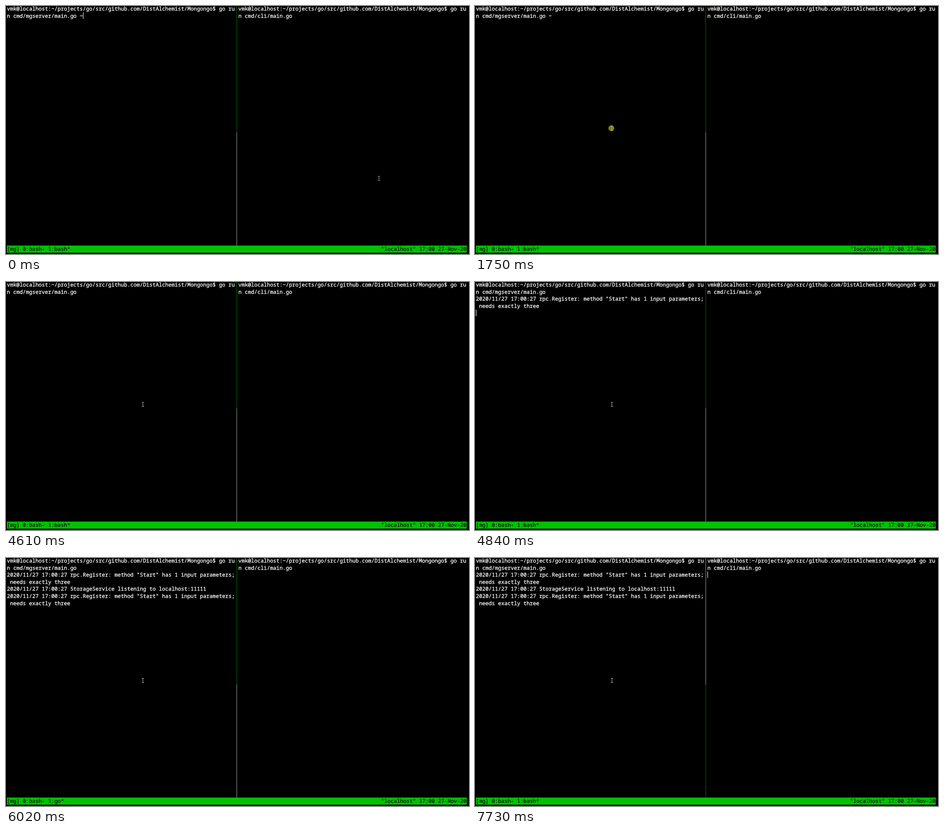
An HTML page that plays this animation: 1023 px wide and 547 px high, repeating every 8000 ms.

```html
<!DOCTYPE html>
<html lang="en">
<head>
<meta charset="utf-8">
<title>Two terminal panes</title>
<style>
  html, body { margin: 0; width: 100%; height: 100%; overflow: hidden; background: #000; }
  svg { display: block; width: 1023px; height: 547px; }
  text {
    font: 11.677px "Noto Sans Mono", "DejaVu Sans Mono", monospace;
    font-variant-ligatures: none;
    text-rendering: geometricPrecision;
    white-space: pre;
    fill: #fff;
    stroke: #fff;
    stroke-width: .3px;
  }
  .status { fill: #000; stroke: #000; stroke-width: .15px; }
</style>
</head>
<body>
<svg id="stage" viewBox="0 0 1023 547"></svg>
<script>
const LOOP = 8000;
const LEFT = 0, RIGHT = 73;              // first column of each pane
const GREEN = '#00c200', DIM = '#007800', GREY = '#a8a8a8';
const stage = document.getElementById('stage');

const colX = col => 2 + col * 7.006;
const rowY = row => -2 + row * 15.6;

function add(tag, attrs, content = '') {
  const el = document.createElementNS('http://www.w3.org/2000/svg', tag);
  for (const key in attrs) el.setAttribute(key, attrs[key]);
  el.textContent = content;
  return stage.appendChild(el);
}

const rect = (x, y, width, height, fill) => add('rect', { x, y, width, height, fill });
const write = (col, row, str, cls = '') =>
  add('text', { x: colX(col), y: rowY(row) + 12, class: cls }, str);

const prompt = 'vmk@localhost:~/projects/go/src/github.com/DistAlchemist/Mongongo$ go ru';
const warning = ['2020/11/27 17:00:27 rpc.Register: method "Start" has 1 input parameters;',
                 ' needs exactly three'];
const listening = '2020/11/27 17:00:27 StorageService listening to localhost:11111';

// Static screen
write(LEFT, 0, prompt);
write(RIGHT, 0, prompt);
write(RIGHT, 1, 'n cmd/cli/main.go');
const upper = rect(509.4, 0, 1, 279, DIM);
const lower = rect(509.4, 279, 1, 249.4, GREY);
rect(2, 528.4, 1016, 15.6, GREEN);
write(118, 34, '"localhost" 17:00 27-Nov-20', 'status');

// Changing parts
const command = write(LEFT, 1, '');
const status = write(LEFT, 34, '', 'status');
const output = [...warning, listening, ...warning].map((line, i) => write(LEFT, i + 2, line));
const caret = rect(0, 0, 1.1, 14.4, '#fff');
const click = add('circle', { cx: 301.2, cy: 269.5, r: 6.5, fill: '#7d7d00' });
const pointer = add('path', {
  d: 'M-2.5-4.5H2.5M0-4V4M-2.5 4.5H2.5',
  fill: 'none', stroke: '#b4b4b4', 'stroke-width': 1
});

// [time, column, row]; no column means the caret is blinked off
const carets = [
  [0, 24, 1], [490], [1040, 24, 1], [1580], [2130, 24, 1],
  [2530, 23, 1], [3060], [3600, 23, 1], [4060, LEFT, 2], [4610],
  [4840, LEFT, 4], [4930, LEFT, 7], [6020],
  [6480, RIGHT + 18, 1], [7660], [7730, RIGHT, 2]
];

// [time, share of the way travelled]
const moves = [[0, 0], [970, .08], [1040, .36], [1120, .7], [1190, .93], [1270, 1]];

// [time, number of output lines]
const prints = [[0, 0], [4840, 2], [4930, 5]];

const at = (steps, t) => steps.findLast(step => step[0] <= t);
const show = (el, on) => el.setAttribute('visibility', on ? 'visible' : 'hidden');

function draw(t) {
  const [, col, row] = at(carets, t);
  show(caret, col !== undefined);
  if (col !== undefined) {
    caret.setAttribute('x', colX(col));
    caret.setAttribute('y', rowY(row) + .5);
  }

  const share = at(moves, t)[1];
  pointer.setAttribute('transform',
    `translate(${824 - 521.5 * share} ${380.3 - 110.3 * share})`);
  show(click, t >= 1750 && t < 1980);

  command.textContent = 'n cmd/mgserver/main.go' + (t < 2530 ? ' ~' : '');
  status.textContent = '[mg] 0:bash- 1:' + (t >= 4930 && t < 6480 ? 'go*' : 'bash*');
  const lines = at(prints, t)[1];
  output.forEach((el, i) => show(el, i < lines));

  const rightActive = t >= 6480;
  upper.setAttribute('fill', rightActive ? GREY : DIM);
  lower.setAttribute('fill', rightActive ? DIM : GREY);
}

const start = performance.now();
function tick() {
  draw((performance.now() - start) % LOOP);
  requestAnimationFrame(tick);
}
tick();
</script>
</body>
</html>
```
